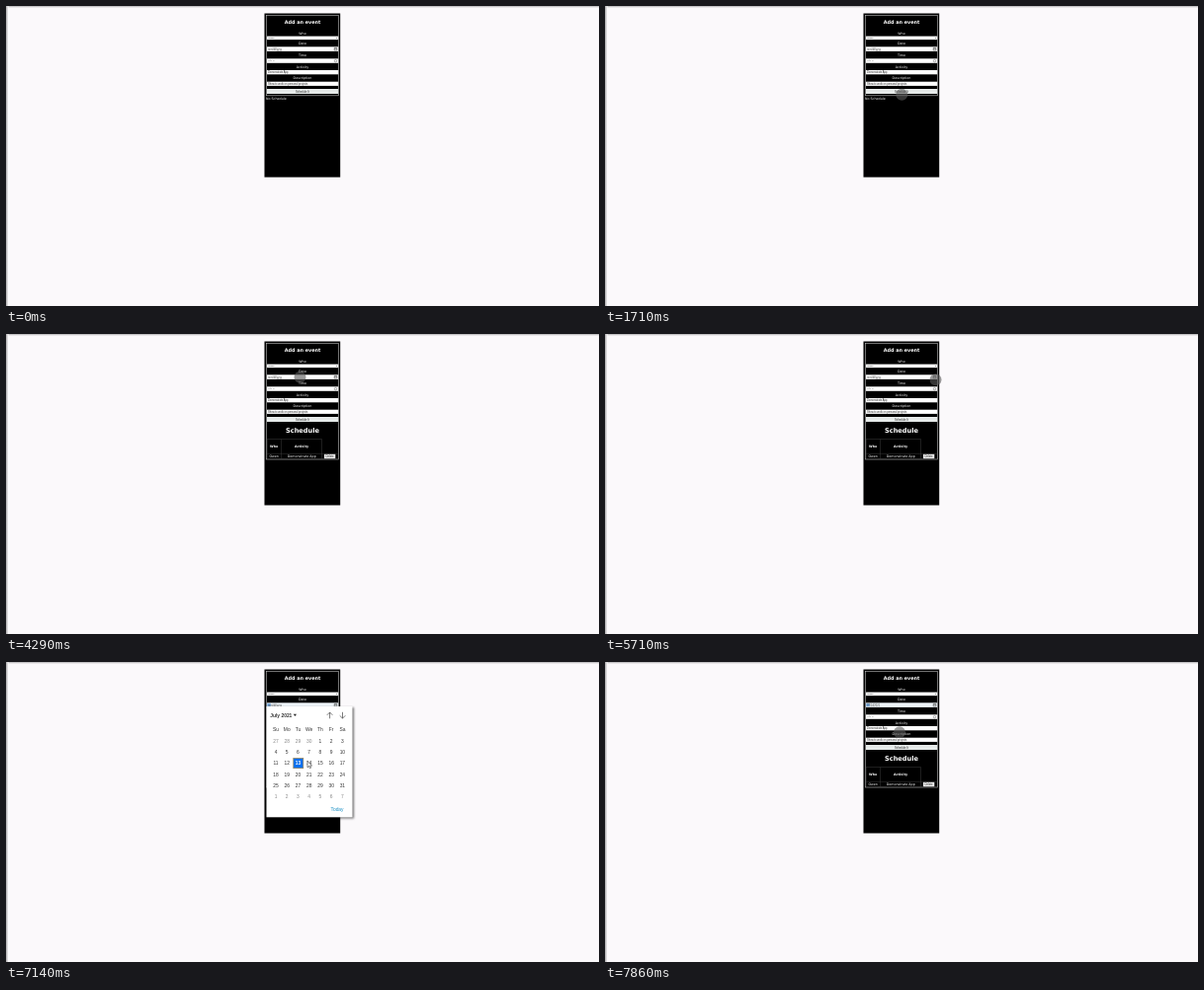
Recreate the animation shown at these times as an HTML page. Size 600 px wide and 304 px high, loop 8 s.

```html
<!DOCTYPE html>
<html lang="en">
<head>
<meta charset="utf-8">
<title>Add an event</title>
<style>
html, body { margin: 0; width: 100%; height: 100%; overflow: hidden; background: #fbf9fb; }
svg { display: block; width: 100vw; height: 100vh; }
text { font: 3.3px "DejaVu Sans", sans-serif; fill: #fff; text-anchor: middle; }
text.b { font-weight: bold; }
text.in { font: 2.65px "Liberation Sans", sans-serif; fill: #222; text-anchor: start; }
text.btn { font: 2.8px "Liberation Sans", sans-serif; fill: #222; }
text.cal { font: 4.9px "Liberation Sans", sans-serif; fill: #333; }
text.out { fill: #8a8a8a; }
</style>
</head>
<body>
<svg viewBox="0 0 600 304" preserveAspectRatio="none">
  <defs>
    <linearGradient id="left"><stop stop-color="#a8a7a9"/><stop offset="1" stop-color="#fbf9fb"/></linearGradient>
    <linearGradient id="top" x2="0" y2="1"><stop stop-color="#b5b4b6"/><stop offset="1" stop-color="#fbf9fb"/></linearGradient>
    <filter id="shade" x="-10%" y="-10%" width="120%" height="120%"><feGaussianBlur stdDeviation="1"/></filter>
    <filter id="soft" x="-20%" y="-20%" width="140%" height="140%"><feGaussianBlur stdDeviation=".4"/></filter>
  </defs>
  <rect width="600" height="304" fill="#fbf9fb"/>
  <rect width="600" height="2" fill="url(#top)"/>
  <rect width="2.5" height="304" fill="url(#left)"/>
  <rect x="261.5" y="7.5" width="76.7" height="166" fill="#000"/>
  <rect id="frame" x="263.3" y="9.3" width="73.4" height="81.5" fill="none" stroke="#bbb" stroke-width=".6"/>
  <g id="form"></g>
  <text id="empty" x="263" y="95.3" style="text-anchor:start">No Schedule</text>
  <g id="plan">
    <path d="M264 106.5H319.5V121.3M264 121.3H336M278.5 106.5V126.5M264.3 106.5V126.5M319.5 121V126.5" fill="none" stroke="#3c3c3c" stroke-width=".5"/>
    <rect x="322" y="121.8" width="11.3" height="4.4" fill="#efefef"/>
  </g>
  <g id="picker">
    <rect x="264" y="46" width="88" height="112.5" fill="#000" opacity=".55" filter="url(#shade)"/>
    <rect x="263.5" y="45" width="87" height="112.3" fill="#fff"/>
    <path d="M290.8 52.8h3.2l-1.6 2.2z" fill="#222"/>
    <path d="M327.6 57.3v-6.3M324.8 53.8l2.8-2.8 2.8 2.8M340.5 50.8v6.3M337.7 54.3l2.8 2.8 2.8-2.8" fill="none" stroke="#444" stroke-width=".7"/>
    <rect x="290.8" y="97.5" width="10" height="10.2" fill="#0b70f0" stroke="#9b8250" stroke-width=".7"/>
  </g>
  <path id="arrow" d="M0 0V6.3L1.5 5 2.5 7.2 3.6 6.7 2.6 4.6H4.6Z" fill="#fff" stroke="#333" stroke-width=".6"/>
  <circle id="dot" r="6" fill="#5a5a5a" opacity=".6" filter="url(#soft)"/>
</svg>
<script>
const $ = id => document.getElementById(id);
const STEP = 1000 / 7, LOOP = 8000;

function add(parent, tag, attrs, text = "") {
  const el = document.createElementNS("http://www.w3.org/2000/svg", tag);
  for (const key in attrs) el.setAttribute(key, attrs[key]);
  el.textContent = text;
  return $(parent).appendChild(el);
}
const label = (parent, text, x, y, cls = "", style = "") =>
  add(parent, "text", { x, y, class: cls, style }, text);
const bar = (y, height, fill = "#fff") =>
  add("form", "rect", { x: 264, y, width: 72.2, height, fill });

// Form
label("form", "Add an event", 300, 18.3, "b", "font-size:4.9px");
[["Who", 28.8], ["Date", 39.3], ["Time", 51.3], ["Activity", 63.3], ["Description", 74.4]]
  .forEach(([text, y]) => label("form", text, 300, y));
bar(30.6, 3.5);
const dateBar = bar(41.3, 4.6);
bar(53.3, 4.5);
bar(65, 4.3);
bar(76.7, 4.2);
bar(84, 5, "#e6eae9");
const mark = add("form", "rect", { x: 264.3, y: 42, width: 3.5, height: 3.1, fill: "#79aee6" });
label("form", "Owen", 265.3, 33.2, "in", "font-size:2.4px");
const date = label("form", "", 265, 44.5, "in", "fill:#555");
label("form", "--:-- --", 265, 56.4, "in");
label("form", "Demonstrate App", 265, 68.1, "in");
label("form", "Show to work on personal projects", 265, 79.7, "in");
label("form", "Schedule It", 300, 87.5, "btn");
add("form", "path", { d: "M333.8 32l.7.8.7-.8M332.2 42.5h2.6v2.4h-2.6zM332.2 43.1h2.6", fill: "none", stroke: "#333", "stroke-width": .5 });
add("form", "circle", { cx: 333.5, cy: 55.6, r: 1.2, fill: "none", stroke: "#333", "stroke-width": .4 });

// Schedule table
label("plan", "Schedule", 300, 100.2, "b", "font-size:6.6px");
label("plan", "Who", 271.2, 115, "b");
label("plan", "Activity", 299, 115, "b");
label("plan", "Owen", 271.2, 125.3);
label("plan", "Demonstrate App", 299.2, 125.3);
label("plan", "Delete", 327.6, 125, "btn");

// Calendar
label("picker", "July 2021", 267.3, 55.6, "cal", "font-weight:bold;text-anchor:start");
label("picker", "Today", 335, 150.7, "cal", "fill:#1a8fc4");
const dayX = col => 273 + col * 11.23;
["Su", "Mo", "Tu", "We", "Th", "Fr", "Sa"].forEach((d, i) => label("picker", d, dayX(i), 70.3, "cal"));
for (let i = 0; i < 42; i++) {
  const day = new Date(2021, 5, 27 + i), july = day.getMonth() === 6, n = day.getDate();
  label("picker", n, dayX(i % 7), 81.8 + Math.floor(i / 7) * 11.25, july ? "cal" : "cal out",
    july && n === 13 ? "fill:#fff;font-weight:bold" : "");
}

// Pointer paths: [step, x, y]; each path is visible from its first step until `end`
const dots = [
  { end: 2, keys: [[1, 299, 28]] },
  { end: 23, keys: [[5, 302, 51], [8, 302.5, 72], [12, 300.3, 89.7]] },
  { end: 42, keys: [[25, 301, 56], [26, 301, 56], [27, 303, 68], [30, 297.5, 43.7], [32, 296, 38],
    [34, 297, 46], [35, 298, 54], [37, 310, 52], [40, 334.5, 46.3]] },
  { end: 56, keys: [[55, 298, 71.3]] }
];
const arrows = [{ end: 52, keys: [[42, 333, 47], [44, 329, 58], [49, 305, 100.5]] }];

function locate(paths, k) {
  const path = paths.find(p => k >= p.keys[0][0] && k < p.end);
  if (!path) return null;
  const { keys } = path, next = keys.findIndex(key => key[0] > k);
  if (next < 0) return keys[keys.length - 1].slice(1);
  const a = keys[next - 1], b = keys[next], u = (k - a[0]) / (b[0] - a[0]);
  return [a[1] + (b[1] - a[1]) * u, a[2] + (b[2] - a[2]) * u];
}
const show = (el, on) => el.style.display = on ? "" : "none";
function place(el, pos) {
  show(el, pos);
  if (pos) el.setAttribute("transform", `translate(${pos})`);
}

function render(t) {
  const k = Math.floor((t + 5) / STEP) % 56;
  const planned = k >= 19, open = k >= 42 && k < 52, focused = k >= 42;
  show($("empty"), !planned);
  show($("plan"), planned);
  $("frame").setAttribute("height", planned ? 117.7 : 81.5);
  show($("picker"), open);
  show(mark, focused);
  dateBar.setAttribute("fill", focused ? "#eef4f8" : "#fff");
  date.textContent = k >= 52 ? "07/14/2021" : "mm/dd/yyyy";
  place($("dot"), locate(dots, k));
  place($("arrow"), locate(arrows, k));
}

const start = performance.now();
function tick() {
  render((performance.now() - start) % LOOP);
  requestAnimationFrame(tick);
}
tick();
</script>
</body>
</html>
```
